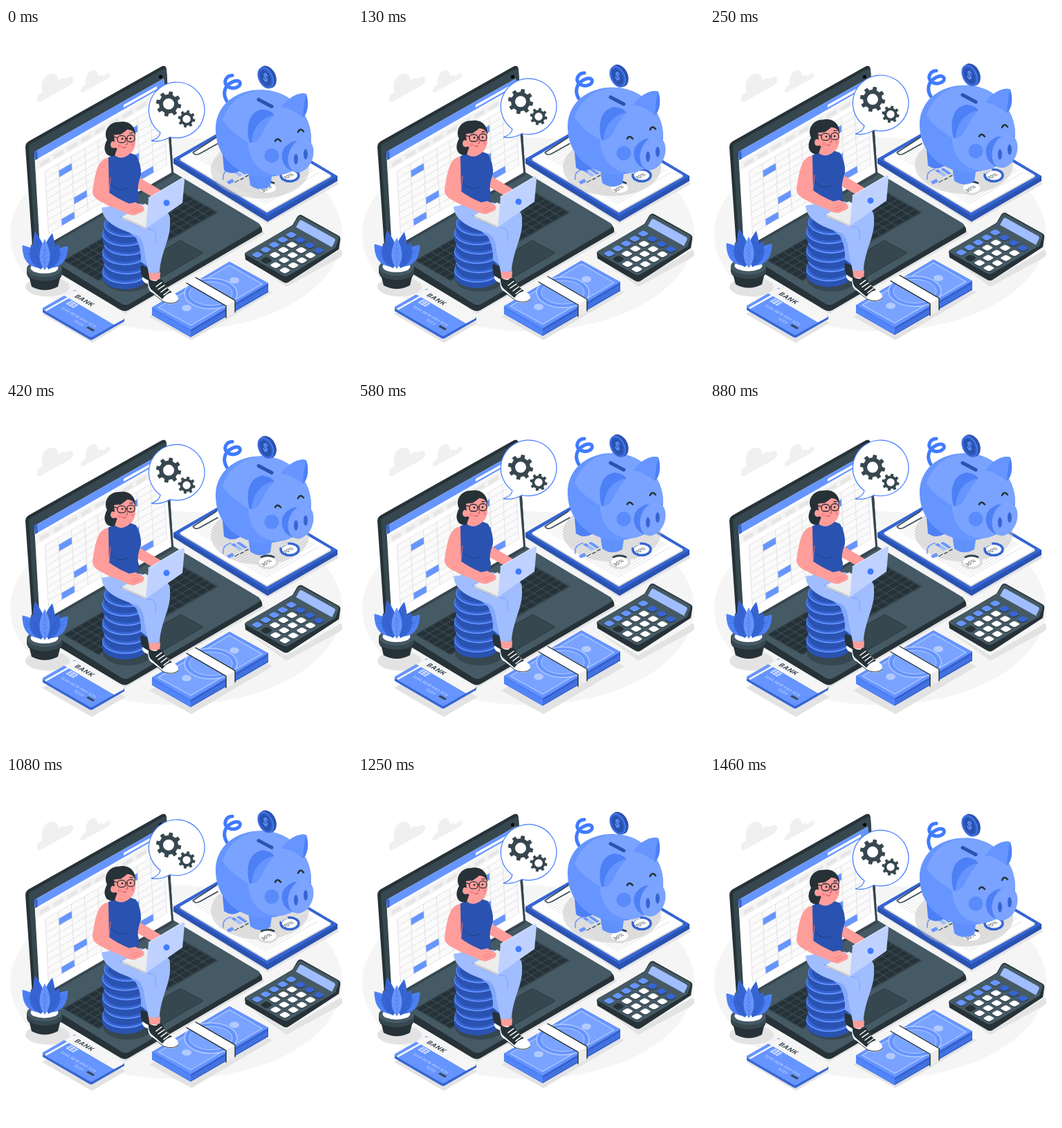
Animation, 500 px wide and 500 px high, one loop 1500 ms. Source, as an HTML page:

```html
<!DOCTYPE html>
<html lang="en">
<head>
<meta charset="utf-8">
<title>Savings</title>
<style>
html, body { margin: 0; width: 100%; height: 100%; overflow: hidden; background: #fff }
svg { display: block; width: 100vw; height: 100vh }
text { font-family: Inter, Arial, sans-serif }
.ink { fill: #263238 } .slate { fill: #37474f } .steel { fill: #455a64 }
.navy { fill: #2a52b0 } .royal { fill: #3665d3 } .blue { fill: #6695ff }
.sky { fill: #a0bdff } .skin { fill: #ff9d9b } .white { fill: #fff }
.mist { fill: #e3e3e3 } .line { fill: none; stroke-linecap: round; stroke-linejoin: round }
</style>
</head>
<body>
<svg viewBox="0 0 500 500">
  <ellipse cx="246" cy="298" rx="240" ry="140" fill="#f5f5f5"/>
  <g fill="#f0f0f0">
    <path d="M45 106Q43 96 53 93C49 80 55 66 66 66Q75 66 76 76Q82 69 86 74Q97 66 97 75Q97 80 91 84L51 106Q46 108 45 106Z"/>
    <path d="M108 93Q107 86 115 82C114 70 119 61 127 61Q132 61 133 70Q137 66 140 70Q150 62 151 67Q151 70 146 74L113 92Q109 94 108 93Z"/>
  </g>

  <g class="mist">
    <path d="M250 202L378 283L481 225L470 208Z"/>
    <path d="M70 348L172 413L374 297L366 284Z"/>
    <ellipse cx="60" cy="374" rx="32" ry="14"/>
    <path d="M52 413L98 389L173 426L124 455Z"/>
    <path d="M207 417L324 350L385 382L268 451Z"/>
    <path d="M349 333L405 366L484 320Q489 327 482 332L405 374Z"/>
  </g>

  <!-- clipboard -->
  <path class="navy" d="M242 189L341 132L479 214V221L378 280L242 196Z"/>
  <path class="royal" d="M242 189L341 132L479 214L378 272Z"/>
  <path fill="#d8d8d8" d="M251 191L341 137L470 215L377 267Z"/>
  <path class="white" d="M251 189L341 137L470 213L377 265Z"/>
  <g transform="matrix(.866 -.5 .866 .5 251 189)"><g id="paperLines" stroke="#dedede" stroke-width=".8"/></g>
  <path class="line" d="M271 181Q274 185 281 181L306 167M270 180L304 158" stroke="#37474f" stroke-width="1.5"/>
  <g data-rise="20"><ellipse cx="367" cy="205" rx="71" ry="42" fill="#bdbdbd" opacity=".45"/></g>
  <path class="line" d="M314 219Q312 207 325 204" stroke="#6695ff" stroke-width="1.5"/>
  <path class="blue" d="M319 222L327 218L330 222L322 226ZM325 206L329 204L341 212L337 214ZM333 204L337 202L349 210L345 212Z"/>
  <path class="sky" d="M330 209L334 207L342 212L338 215Z"/>
  <path class="line" d="M331 223L336 220M339 219L343 217M346 215L350 213" stroke="#455a64" stroke-width="1.4"/>
  <ellipse cx="378" cy="231" rx="14" ry="9" fill="#fff" stroke="#dcdcdc" stroke-width="3.5"/>
  <path class="line" d="M369 224Q378 220 387 224" stroke="#37474f" stroke-width="3"/>
  <ellipse cx="410" cy="213" rx="13" ry="8.5" fill="#fff" stroke="#3665d3" stroke-width="3.5"/>
  <path class="line" d="M398 209Q401 205 406 205" stroke="#dcdcdc" stroke-width="3.5"/>
  <g class="ink" font-size="7" text-anchor="middle">
    <text transform="matrix(.866 -.5 .6 .75 378 234)">30%</text>
    <text transform="matrix(.866 -.5 .6 .75 410 216)">70%</text>
  </g>

  <!-- piggy bank -->
  <g data-rise="20">
    <path class="line" d="M319 106C313 96 315 85 326 79C336 74 341 79 337 84C329 92 312 85 318 74Q321 69 327 69" stroke="#407bff" stroke-width="5"/>
    <path fill="#4d80f5" d="M312 172L315 206Q326 214 338 207L346 190Z"/>
    <path fill="#6090fb" d="M348 195L353 228Q367 238 382 229L386 200Z"/>
    <path fill="#6695ff" d="M303 150C301 113 332 88 373 90C412 92 441 125 441 160C441 190 420 210 395 213C368 221 335 211 319 191Q304 174 303 150Z"/>
    <path fill="#79a3ff" d="M313 133C322 106 345 90 373 90C412 92 441 125 441 160C441 190 420 210 395 213C365 213 350 190 350 166C338 158 321 148 313 133Z"/>
    <path class="line" d="M365 104L384 114" stroke="#2a52b0" stroke-width="5"/>
    <path fill="#4d80f5" d="M398 115C408 101 424 92 434 96C438 108 437 124 429 130Q414 116 398 115Z"/>
    <path class="blue" d="M398 115C408 101 424 92 434 96Q430 108 429 130Q414 116 398 115Z"/>
    <path fill="#4d80f5" d="M352 166C346 145 350 121 371 118Q382 119 388 126Q375 138 368 154Q361 168 352 166Z"/>
    <path class="blue" d="M355 166C356 147 367 130 388 126Q376 139 369 155Q362 167 355 166Z"/>
    <circle cx="384" cy="185" r="10.5" fill="#5a8bfa"/>
    <path class="line" d="M389 164Q392 158 397 164M422 151Q425 144 430 150" stroke="#263238" stroke-width="2.5"/>
    <path fill="#4d80f5" d="M399 190Q396 172 416 164L440 163L425 209Q403 208 399 190Z"/>
    <ellipse cx="426" cy="185" rx="17.5" ry="25" transform="rotate(20 426 185)" fill="#7ba3ff"/>
    <g class="royal"><ellipse cx="419" cy="190" rx="3" ry="7.5"/><ellipse cx="433" cy="183" rx="3" ry="7.5"/></g>
  </g>
  <g data-rise="10">
    <g transform="rotate(-25 376 72)">
      <ellipse class="navy" cx="378" cy="72" rx="12" ry="17"/>
      <ellipse class="blue" cx="375" cy="72" rx="10.5" ry="16.5"/>
      <ellipse class="royal" cx="375" cy="72" rx="9.8" ry="15.7"/>
      <ellipse class="navy" cx="375" cy="72" rx="7.5" ry="12.5"/>
    </g>
    <text transform="matrix(.75 .4 -.1 1 374.5 77)" font-size="15" font-weight="700" text-anchor="middle" fill="#6695ff">$</text>
  </g>

  <!-- laptop -->
  <path class="ink" d="M45 320L241 208L366 284Q371 288 370 295L178 407Q172 411 165 407L45 335Z"/>
  <path class="steel" d="M45 322L241 208L365 282Q370 286 364 290L178 399Q172 402 166 398Z"/>
  <path class="ink" d="M28 172Q28 166 34 163L224 56Q231 52 232 60L242 212L47 324Q39 323 38 315Z"/>
  <path class="slate" d="M33 173Q33 168 38 166L226 60Q232 57 232 62L242 212L47 324Q43 320 42 314Z"/>
  <circle cx="223.5" cy="70.5" r="2.5"/>
  <path class="white" d="M41 179L228 73L239 209L49 319Z"/>
  <path class="blue" d="M41 179L228 73L229 84L42 191Z"/>
  <path class="royal" d="M41 179L45 177L46 189L42 191Z"/>
  <path class="white" d="M170 111L218 84V88L170 115Z"/>
  <path fill="#f3f3f3" d="M43 194L229 87L230 98L44 206Z"/>
  <g id="sheet" transform="matrix(1 -.58 .055 1 44 205)"></g>
  <g transform="matrix(.866 -.497 .866 .5 82 336)">
    <rect class="slate" width="200" height="60" rx="2"/>
    <g id="keyboard" class="ink"></g>
  </g>
  <path d="M252 307L285 325L225 360L192 342Z" fill="#37474f" stroke="#263238" stroke-width=".8"/>
  <ellipse class="slate" cx="176" cy="362" rx="36" ry="19"/>

  <!-- calculator -->
  <g data-rise="10">
    <path class="ink" d="M345 326L414 285L421 273Q424 269 428 271L480 300Q484 302 483 307L481 320L409 367Q405 370 400 367L346 335Z"/>
    <path class="steel" d="M347 324L414 286L422 274Q424 271 428 273L479 301Q482 303 480 307L476 318L408 358Q404 360 400 358L347 328Q345 326 347 324Z"/>
    <path class="sky" d="M419 288L424 279Q426 277 429 279L474 304Q477 306 475 309L471 317Z"/>
    <g id="buttons"></g>
  </g>

  <!-- banknotes -->
  <g data-rise="10">
    <path class="royal" d="M211 404L323 338L379 369V382L267 447L211 415Z"/>
    <path fill="#4d80f5" d="M211 404L267 436V447L211 415Z"/>
    <path class="line" d="M211 409L267 441L379 375M211 412L267 444L379 378" stroke="#6695ff" stroke-width=".8"/>
    <path class="blue" d="M211 404L323 338L379 369L267 436Z"/>
    <path d="M220 404L323 343L370 370L267 430Z" fill="#79a3ff" stroke="#b3caff" stroke-width="1.2"/>
    <ellipse cx="296" cy="384" rx="38" ry="22" fill="#6695ff" stroke="#b3caff" stroke-width="1.5"/>
    <ellipse cx="296" cy="384" rx="31" ry="17" fill="#79a3ff" stroke="#b3caff"/>
    <g fill="#b3caff"><ellipse cx="261" cy="405" rx="7" ry="4.5"/><ellipse cx="330" cy="365" rx="7" ry="4.5"/></g>
    <path d="M261 369L274 361L331 394V411L318 419V402Z" class="white"/>
    <path d="M318 402L331 394V411L318 419Z" fill="#ececec"/>
    <path class="line" d="M261 369L318 402V419M274 361L331 394V411" stroke="#263238" stroke-width="1.4"/>
  </g>

  <!-- woman on coins -->
  <g data-rise="10">
    <g id="coins"></g>
    <path class="ink" d="M195 343Q193 350 197 360L208 368V347Z"/>
    <path class="white" d="M197 360L207 366V370Q200 370 197 364Z"/>
    <path fill="#83a8f9" d="M160 280L188 304Q196 320 195 338L206 346L215 285Z"/>
    <path class="sky" d="M138 260C140 284 168 292 190 300Q199 306 200 324L206 354Q214 357 222 353C223 328 237 305 237 286V275Q236 266 226 262L194 254L150 258Z"/>
    <path class="line" d="M164 272Q188 289 213 292Q218 296 216 310" stroke="#79a3ff" stroke-width="1"/>
    <path class="skin" d="M206 353Q214 356 223 353L222 368H208Z"/>
    <path class="white" d="M206 364Q203 379 213 384L229 397Q243 402 249 394Q250 386 241 383L222 365Z"/>
    <path class="ink" d="M206 362Q205 376 212 380L226 392Q231 384 240 382Q231 376 227 366Q223 360 217 366Q210 366 206 362Z"/>
    <path class="line" d="M217 374L225 368M220 378L229 372M224 382L232 376M228 386L236 380" stroke="#fff" stroke-width="1.5"/>
    <path class="line" d="M211 383L228 396Q242 401 249 394" stroke="#263238" stroke-width="1"/>

    <path class="skin" d="M187 208L194 217L219 232Q230 238 225 244L211 244L188 231Z"/>
    <path class="navy" d="M147 188L158 182Q167 190 180 181L188 184Q196 198 195 213Q188 231 192 241L191 254Q171 265 148 257Z"/>
    <path class="line" d="M152 226Q162 238 177 231" stroke="#21428f" stroke-width="1.2"/>
    <path class="skin" d="M157 174V184Q166 192 178 183L175 174Z"/>
    <path class="ink" d="M157 185Q151 187 146 183Q139 175 146 162C140 149 149 136 163 136C177 133 188 142 187 156L180 168L160 176Z"/>
    <path class="skin" d="M156 155Q169 154 175 147Q186 147 187 159C188 173 183 183 174 183Q164 182 159 173Q152 176 151 169Q152 162 157 165Z"/>
    <g fill="#f98787"><circle cx="164" cy="171" r="2.6"/><circle cx="183" cy="169" r="2"/></g>
    <g class="line" stroke="#263238" stroke-width="1.3">
      <rect x="161" y="156" width="12" height="10" rx="4.5"/><rect x="175" y="155" width="11" height="10" rx="4.5"/>
      <path d="M173 160H175M161 159L154 157M164 154L168 152M179 152L183 152"/>
    </g>
    <g class="ink"><circle cx="168" cy="160.5" r="1.4"/><circle cx="180" cy="160" r="1.4"/></g>
    <path class="line" d="M174 163L176 168L173 169M168 172Q171 175 174 172" stroke="#b5494f" stroke-width="1"/>

    <path fill="#ededed" d="M168 273L201 254L214 262L203 290Z"/>
    <path fill="#cfcfcf" d="M168 273L202 288V291L168 276Z"/>
    <path class="skin" d="M148 188C132 189 129 211 125 236C125 247 136 250 146 256L168 265Q175 270 185 271L197 266Q202 262 198 258L187 252L178 254Q161 247 149 238Z"/>
    <path class="line" d="M149 238L151 216M180 264L190 260M184 267L194 262" stroke="#ef7a79" stroke-width=".9"/>
    <path fill="#bfd2ff" d="M206 246L255 217Q258 216 258 220L255 253L202 290Z"/>
    <path class="line" d="M206 246L255 217" stroke="#dbe6ff" stroke-width="1.2"/>
    <circle cx="232" cy="253" r="4.5" fill="#407bff"/>
  </g>

  <!-- speech bubble -->
  <g data-rise="30">
    <path d="M223 152A40.3 40.3 0 1 1 237 158.5Q224 166 210 164Q222 160 223 152Z" fill="#fff" stroke="#407bff" stroke-width="1.2"/>
  </g>
  <g data-rise="20" id="gears" class="slate" fill-rule="evenodd"></g>

  <!-- plant -->
  <g data-rise="10">
    <path class="ink" d="M30 350Q30 360 34 362L37 374Q56 384 75 374L78 362Q81 360 81 350Z"/>
    <path class="slate" d="M30 349V356Q35 365 56 366Q77 365 81 356V349Z"/>
    <ellipse class="steel" cx="55.5" cy="348" rx="25.5" ry="12"/>
    <ellipse class="white" cx="55.5" cy="347" rx="20" ry="8"/>
    <g id="leaves"></g>
  </g>

  <!-- bank card -->
  <g data-rise="10">
    <path class="royal" d="M53 405L99 379L171 420V424L126 450Q123 452 120 450L53 411Z"/>
    <path class="blue" d="M55 404L84 387L156 429L126 446Q123 448 120 446L54 408Q51 406 55 404Z"/>
    <path fill="#f6f6f6" d="M84 387L95 381Q99 379 103 381L169 418Q172 420 169 422L156 429Z"/>
    <path class="line" d="M58 408L90 390" stroke="#fff" stroke-width="2.5"/>
    <g transform="matrix(.866 .5 -.866 .5 99 379)">
      <text x="9" y="10" font-size="9.5" font-weight="700" letter-spacing=".5" class="slate">BANK</text>
      <rect x="12" y="18" width="13" height="9" rx="2" fill="#d9e5ff"/>
      <path class="line" d="M12 21H25M12 24H25M16 18V27M21 18V27" stroke="#6695ff" stroke-width=".8"/>
      <g fill="#dbe6ff" font-size="5.6"><text x="14" y="38" letter-spacing=".2">1234 5678 9101 1213</text><text x="44" y="46">12/23</text></g>
      <rect x="64" y="41" width="11" height="3.5" class="slate"/>
    </g>
  </g>
</svg>
<script>
const fill = (id, markup) => { document.getElementById(id).innerHTML += markup };
const repeat = (n, draw) => Array.from({ length: n }, (_, i) => draw(i)).join('');
const rect = (x, y, w, h, attrs = '') => `<rect x="${x}" y="${y}" width="${w}" height="${h}" ${attrs}/>`;

fill('paperLines', repeat(32, i => `<path d="M${i < 13 ? 14 : 6} ${12 + i * 4}H${i % 5 ? 96 : 70}"/>`));

const cells = [[1, 1], [2, 6], [1, 8], [7, 8], [6, 1], [6, 5]];
fill('sheet',
  repeat(9, i => rect(5 + i * 20, -7, 14, 6, 'fill="#e6e6e6"')) +
  rect(12, 9, 171, 90, 'fill="#fafafa"') +
  cells.map(([c, r]) => rect(12 + c * 19, 9 + r * 10, 19, 10, 'class="blue"')).join('') +
  `<g stroke="#dcdcdc" stroke-width=".8">${repeat(10, i => `<path d="M12 ${9 + i * 10}H183M${12 + i * 19} 9V99"/>`)}</g>`);

fill('keyboard', repeat(90, i => {
  const col = i % 15, row = i / 15 | 0;
  return rect(col * 13.2 + 1.5, row * 9.6 + 1.5, 11.6, 8, 'rx="1.5"');
}));

fill('buttons', repeat(20, n => {
  const i = n % 5, j = n / 5 | 0;
  const colour = i == 4 || j == 0 ? (i == 4 && j ? '#3665d3' : '#6695ff') : i + j == 1 ? '#263238' : '#fff';
  return `<g transform="matrix(.866 -.5 .866 .5 ${363 + i * 12.3 + j * 13.3} ${328 - i * 7.2 + j * 7.5})">` +
    rect(-6, -4, 10, 10, 'rx="3" fill="#263238"') + rect(-5, -5, 10, 10, `rx="3" fill="${colour}"`) + '</g>';
}));

const ellipse = (x, y, rx, ry, cls) => `<ellipse cx="${x}" cy="${y}" rx="${rx}" ry="${ry}" class="${cls}"/>`;
fill('coins', repeat(6, i => {
  const x = 173 + (i % 2 ? 1.5 : -1), y = 352 - i * 13.5;
  return `<path class="navy" d="M${x - 33} ${y}v8a33 18 0 0 0 66 0v-8z"/>` +
    ellipse(x, y, 33, 18, 'blue') + ellipse(x, y - .8, 32, 17, 'royal') + ellipse(x, y, 27, 13.5, 'navy');
}));

function gear(x, y, outer, inner, hole, turn) {
  const teeth = 8, corners = [[-.28, inner], [-.19, outer], [.19, outer], [.28, inner]];
  const points = Array.from({ length: teeth * 4 }, (_, k) => {
    const [offset, r] = corners[k % 4];
    const a = ((k >> 2) + offset) * 2 * Math.PI / teeth + turn;
    return `${(x + r * Math.cos(a)).toFixed(2)} ${(y + r * Math.sin(a)).toFixed(2)}`;
  });
  return `<path d="M${points.join('L')}ZM${x - hole} ${y}a${hole} ${hole} 0 1 0 ${hole * 2} 0a${hole} ${hole} 0 1 0 ${-hole * 2} 0"/>`;
}
fill('gears', gear(235, 110.3, 18.3, 14, 8, .2) + gear(261, 132, 12.6, 9.6, 5.7, .2));

function leaf([x, y, angle, length, width, colour]) {
  return `<g transform="translate(${x} ${y}) rotate(${angle})">
    <path fill="${colour}" d="M0 0C${-width} ${-length * .3} ${-width * .8} ${-length * .65} 0 ${-length}C${width * .8} ${-length * .65} ${width} ${-length * .3} 0 0"/>
    <path class="line" d="M0 0V${-length * .85}${repeat(4, i => `M-4 ${-length * (.3 + i * .13)}l4 4l4 -4`)}" stroke="#2a52b0" stroke-width=".5" opacity=".55"/></g>`;
}
fill('leaves', [
  [53, 347, -12, 54, 12, '#3665d3'], [58, 347, 10, 51, 12, '#3665d3'],
  [50, 347, -39, 42, 15, '#4d80f5'], [62, 347, 41, 42, 15, '#4d80f5'],
  [51, 349, -22, 39, 13, '#3665d3'], [61, 349, 23, 40, 13, '#3665d3'],
  [56, 350, 0, 45, 11, '#6695ff']
].map(leaf).join(''));

const floaters = document.querySelectorAll('[data-rise]');
function render() {
  const phase = (performance.now() + 20) % 1500 / 1500;
  const lift = 1 - Math.abs(1 - 2 * phase);
  for (const el of floaters) el.setAttribute('transform', `translate(0 ${-el.dataset.rise * lift})`);
  requestAnimationFrame(render);
}
render();
</script>
</body>
</html>
```
